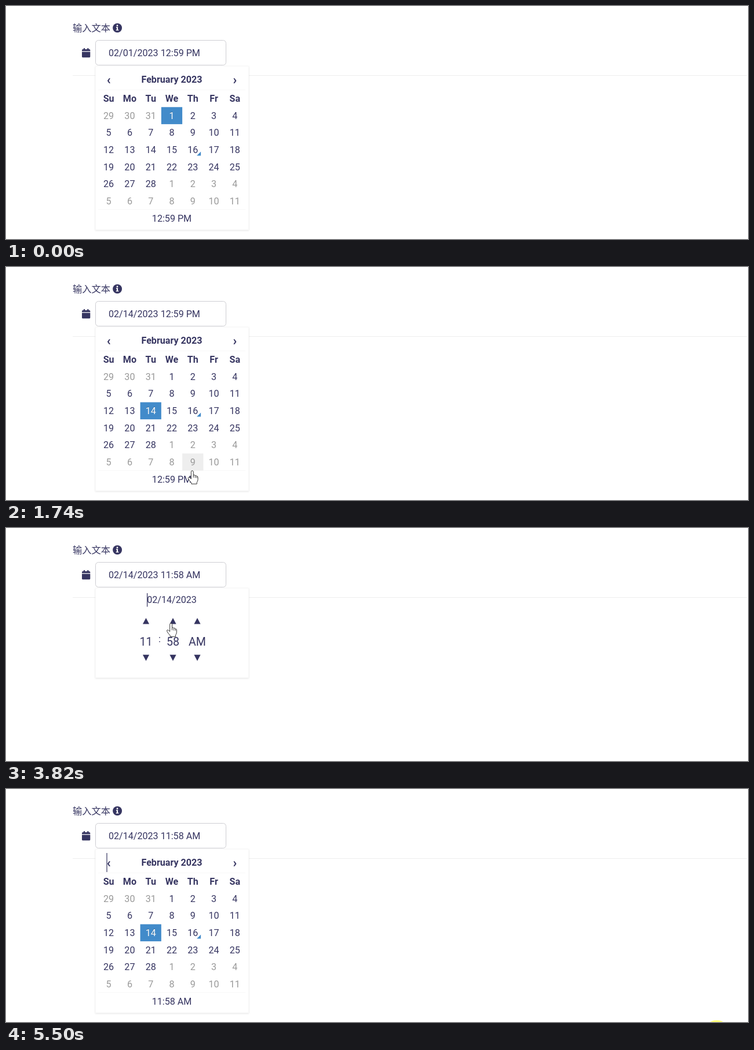
An HTML page that plays this animation: 1280 px wide and 404 px high, repeating every 5590 ms.

```html
<!DOCTYPE html>
<html lang="zh">
<head>
<meta charset="utf-8">
<style>
  html, body { margin: 0; width: 100%; height: 100%; overflow: hidden; background: #fff; }
  svg { display: block; width: 1280px; height: 404px; font: 16.1px Roboto, "Noto Sans CJK SC", "Noto Sans CJK", sans-serif; fill: #363561; }
  .mid { text-anchor: middle; }
  .bold { font-weight: 700; }
  .old { fill: #999; }
  .active { fill: #fff; text-shadow: 0 -1px 0 rgba(0,0,0,.25); }
  .big { font-size: 19.6px; }
  .arrow { font-size: 22px; }
  .panel { fill: #fff; stroke: #f8f8f8; filter: drop-shadow(0 1px 1.5px rgba(0,0,0,.1)); }
  .rule { stroke: #f8f8f8; }
  .hover { fill: #eee; }
  .blue { fill: #428bca; }
  .cursor { fill: #fff; stroke: #333; stroke-linejoin: round; }
</style>
</head>
<body>
<svg viewBox="0 0 1280 404">
  <text x="115" y="43.8" font-size="16.25">输入文本</text>
  <circle cx="192.1" cy="38" r="8"/>
  <path d="M190.1 36.3h3v4.6h1.2v1.7h-4.5v-1.7h1.2v-2.9h-.9z" fill="#fff"/>
  <circle cx="192" cy="33.9" r="1.4" fill="#fff"/>
  <path d="M131 78.2v-1.7q0-1.6 1.6-1.6h1.2v-1.2q0-.7.8-.7h.8q.7 0 .7.7v1.2h4.1v-1.2q0-.7.7-.7h.8q.8 0 .8.7v1.2h1.2q1.6 0 1.6 1.6v1.7zM131 79.5h14.3v8.3q0 1.5-1.6 1.5h-11.1q-1.6 0-1.6-1.5z"/>
  <path d="M115 120.5H1278" stroke="#eee"/>
  <rect x="154.5" y="59.5" width="225" height="43" rx="5" fill="#fff" stroke="#cdcdd2"/>
  <text id="value" x="177" y="86.6"></text>
  <g id="picker"></g>
  <rect id="caret" width="1.2"/>
  <ellipse id="spot" cx="1226" cy="406" rx="12" ry="5" fill="#ffff7a"/>
  <g id="hand" class="cursor">
    <path d="M-2.5 2Q-2.3 0-.6 0Q1.2 0 1.4 2V8.2Q2 7.2 3.2 7.5Q4.4 7.8 4.5 8.8Q5.4 8 6.4 8.5Q7.2 9 7.2 9.8Q9.2 9.4 9.2 11.5V15.5Q9.2 18 7.4 20.3V23H-2V21Q-5 18.5-7.6 13.5Q-8 11.6-6.2 11.5Q-4.8 11.6-2.5 14.2Z"/>
    <path d="M1.4 8V12M4.5 9V12.4M7.2 10V12.6" fill="none"/>
  </g>
  <path id="arrow" class="cursor" d="M.5.5V17.4L4.3 13.8 7.1 20.2 9.6 19.1 6.9 12.9H12.5Z"/>
</svg>
<script>
const LOOP = 5590, STEP = 67;
const COL = 36.28, ROW = 29.6, LEFT = 159, TOP = 175.3;
const COUNTERS = [241.5, 288, 330];
const CLICK = { day: 1000, time: 2060, hour: 2790, minute: 3410, date: 4290 };

const power = n => k => k ** n;
const linear = power(1);
const easeOut = k => 1 - (1 - k) ** 2;
const easeInOut = k => k < .5 ? 2 * k * k : 1 - 2 * (1 - k) ** 2;

const START = { x: 894, y: 367 };
const MOVES = [
  { from: 130, to: 730, x: 252, y: 250, ease: easeOut },
  { from: 730, to: 1280, x: 236, y: 249, ease: easeOut },
  { from: 1350, to: 1740, x: 322, y: 353, ease: easeInOut },
  { from: 1740, to: 1880, x: 310, y: 364, ease: linear },
  { from: 2010, to: 2410, x: 239, y: 258, ease: easeOut },
  { from: 2410, to: 3090, x: 238, y: 226, ease: easeOut },
  { from: 3160, to: 3400, x: 287, y: 224, ease: easeInOut },
  { from: 3640, to: 3960, x: 284, y: 128, ease: easeInOut },
  { from: 4350, to: 4890, x: 885, y: 353, ease: power(4), easeY: power(2.5) },
  { from: 4890, to: 5140, x: 1152, y: 410, ease: linear, easeY: power(2) }
];

const $ = id => document.getElementById(id);
const text = (x, y, s, cls = "") => `<text class="mid ${cls}" x="${x}" y="${y}">${s}</text>`;
const box = (x, y, w, h, cls) => `<rect class="${cls}" x="${x}" y="${y}" width="${w}" height="${h}"/>`;
const rule = y => `<path class="rule" d="M159 ${y}H413"/>`;
const show = (id, on) => $(id).setAttribute("visibility", on ? "visible" : "hidden");

function pointerAt(t) {
  if (t < MOVES[0].from) return [-99, -99];
  let { x, y } = START;
  for (const m of MOVES) {
    const k = Math.min(1, Math.max(0, (t - m.from) / (m.to - m.from)));
    x += (m.x - x) * m.ease(k);
    y += (m.y - y) * (m.easeY || m.ease)(k);
  }
  return [x, y];
}

function targetAt([x, y], timeMode) {
  if (x < LEFT || x > 413 || y < 106) return "";
  if (timeMode) {
    if (y < 143) return "header";
    const col = COUNTERS.findIndex(c => Math.abs(x - c) < 21.5);
    if (col < 0) return "";
    if (y > 144 && y < 179) return "up" + col;
    return y > 207 && y < 246 ? "down" + col : "";
  }
  if (y < 145) return "header";
  if (y < TOP) return "";
  if (y < TOP + 6 * ROW) return "day" + (Math.floor((y - TOP) / ROW) * 7 + Math.floor((x - LEFT) / COL));
  return y < 383 ? "time" : "";
}

function dayView(selected, time, hover) {
  let s = box(154.5, 104.5, 264, 283.5, "panel") + rule(145.5) + rule(352.8);
  s += text(177.2, 135, "‹", "bold arrow") + text(394.8, 135, "›", "bold arrow");
  s += text(286, 132.7, "February 2023", "bold");
  ["Su", "Mo", "Tu", "We", "Th", "Fr", "Sa"].forEach((d, i) =>
    s += text(LEFT + COL * (i + .5), 166, d, "bold"));
  for (let i = 0; i < 42; i++) {
    const n = i - 2, old = n < 1 || n > 28, active = n === selected;
    const x = LEFT + COL * (i % 7), y = TOP + ROW * Math.floor(i / 7);
    if (active) s += box(x, y, COL, ROW, "blue");
    else if (hover === "day" + i) s += box(x, y, COL, ROW, "hover");
    s += text(x + COL / 2, y + 20.4, n < 1 ? n + 31 : n > 28 ? n - 28 : n, active ? "active" : old ? "old" : "");
    if (n === 16) s += `<path class="blue" d="M${x + 32} ${y + 18}v7h-7z"/>`;
  }
  if (hover === "time") s += box(LEFT, 353, 254, 29.5, "hover");
  return s + text(286, 373.7, time);
}

function timeView(time, hover) {
  let s = box(154.5, 104.5, 264, 155, "panel") + text(286, 130, "02/14/2023");
  const parts = time.split(/[: ]/);
  COUNTERS.forEach((x, i) => {
    if (hover === "up" + i) s += box(x - 21.5, 145, 43, 34, "hover");
    if (hover === "down" + i) s += box(x - 21.5, 208, 43, 34, "hover");
    s += `<path d="M${x} 156l5.6 10.6h-11.2zM${x} 230.6l5.6-10.8h-11.2z"/>` + text(x, 203.9, parts[i], "big");
  });
  return s + text(265, 198.4, ":");
}

// Every click restarts the caret's blinking at the clicked text.
function drawCaret(t, timeMode) {
  const reset = Object.values(CLICK).filter(c => c <= t).pop();
  show("caret", reset !== undefined && (t - reset) % 1000 < 500);
  const onDay = t < CLICK.time;
  const [x, y, height] = onDay ? [240.4, 238, 20] : timeMode ? [243, 113, 23.5] : [173.4, 111, 33];
  const caret = $("caret");
  for (const [name, v] of Object.entries({ x, y, height, fill: onDay ? "#fff" : "#363561" }))
    caret.setAttribute(name, v);
}

let lastPicker = "";
function render(t) {
  const timeMode = t >= CLICK.time && t < CLICK.date;
  const day = t < CLICK.day ? 1 : 14;
  const time = t < CLICK.hour ? "12:59 PM" : t < CLICK.minute ? "11:59 AM" : "11:58 AM";
  $("value").textContent = `02/${String(day).padStart(2, "0")}/2023 ${time}`;

  // The page reacts one step after the pointer.
  const hover = targetAt(pointerAt(t - STEP), timeMode);
  const picker = timeMode ? timeView(time, hover) : dayView(day, time, hover);
  if (picker !== lastPicker) $("picker").innerHTML = lastPicker = picker;

  const pos = pointerAt(t), onTarget = targetAt(pos, timeMode) !== "";
  for (const id of ["hand", "arrow"]) {
    $(id).setAttribute("transform", `translate(${pos})`);
    show(id, (id === "hand") === onTarget);
  }
  drawCaret(t, timeMode);
  show("spot", t >= 5490);
}

const begin = performance.now();
function tick() {
  const t = (performance.now() - begin) % LOOP;
  render(Math.floor((t + 5) / STEP) * STEP);
  requestAnimationFrame(tick);
}
tick();
</script>
</body>
</html>
```
